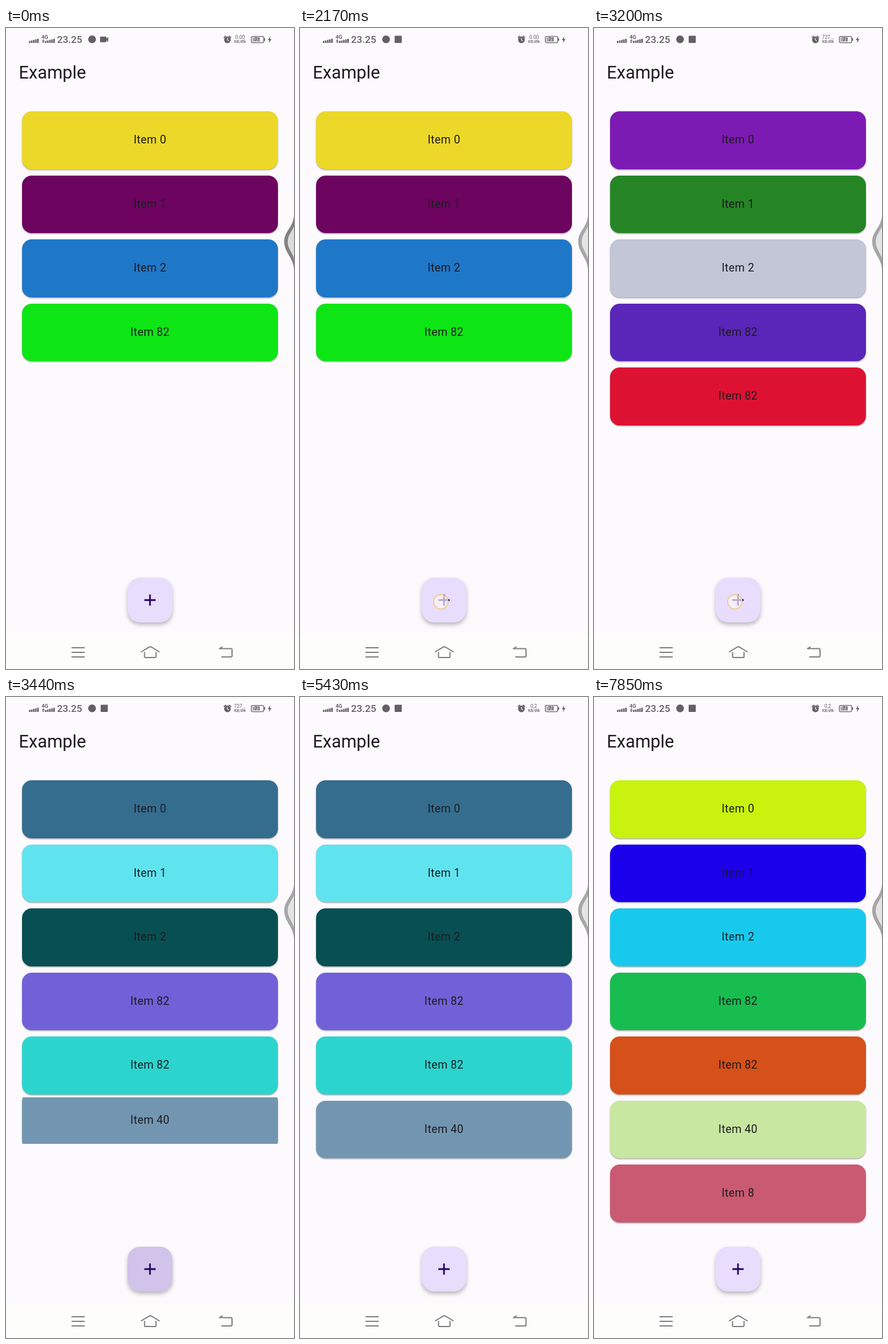
Write an HTML page that moves like this. It is 502x1116 px and loops after 8000 ms.

```html
<!DOCTYPE html>
<html lang="en">
<head>
<meta charset="utf-8">
<title>Animated list</title>
<style>
  html, body { margin: 0; width: 100%; height: 100%; overflow: hidden; background: #fdfafe; }
  body { position: relative; font-family: Roboto, sans-serif; }
  :root { --loop: 8s; --row: 111.53px; }

  /* List */
  .list { position: absolute; left: 22.4px; top: 139.7px; width: 457.2px; }
  .slot { height: var(--row); display: flex; align-items: center; overflow: hidden; }
  .card {
    flex: none; box-sizing: border-box; width: 446px; height: 100.4px; margin: 0 5.6px;
    border-radius: 16.7px; text-align: center; color: #1d1b20;
    font-size: 19.5px; line-height: 100.4px; letter-spacing: .35px;
    box-shadow: 0 1.4px 2px rgba(0, 0, 0, .26), 0 1px 3px rgba(0, 0, 0, .12);
    animation: recolor var(--loop) step-end infinite;
  }
  @keyframes recolor {
    0% { background-color: var(--a); }
    27.675% { background-color: var(--b); }
    40.3% { background-color: var(--c); }
    75.925%, 100% { background-color: var(--d); }
  }
  .first { animation: grow-first var(--loop) linear infinite; }
  .second { animation: grow-second var(--loop) linear infinite; }
  .third { animation: grow-third var(--loop) linear infinite; }
  @keyframes grow-first { 0%, 27.675% { height: 0; } 31.425%, 100% { height: var(--row); } }
  @keyframes grow-second { 0%, 40.3% { height: 0; } 44.05%, 100% { height: var(--row); } }
  @keyframes grow-third { 0%, 75.925% { height: 0; } 79.675%, 100% { height: var(--row); } }

  /* Status bar, side handle, button */
  svg { position: absolute; left: 0; top: 0; width: 502px; height: 1116px; }
  .status { fill: #626064; }
  .video { animation: until-swap var(--loop) step-end infinite; }
  .badge { animation: after-swap var(--loop) step-end infinite; }
  @keyframes until-swap { 0% { opacity: 1; } 10.625%, 100% { opacity: 0; } }
  @keyframes after-swap { 0% { opacity: 0; } 10.625%, 100% { opacity: 1; } }
  .rate { text-anchor: middle; font-size: 8.6px; animation: var(--loop) step-end infinite; }
  .idle { animation-name: rate-idle; }
  .busy { animation-name: rate-busy; }
  .slow { animation-name: rate-slow; }
  @keyframes rate-idle { 0% { opacity: 1; } 28.4%, 100% { opacity: 0; } }
  @keyframes rate-busy { 0% { opacity: 0; } 28.4% { opacity: 1; } 61.25%, 100% { opacity: 0; } }
  @keyframes rate-slow { 0% { opacity: 0; } 61.25%, 100% { opacity: 1; } }

  .handle { animation: dim var(--loop) linear infinite; }
  @keyframes dim { 0%, 12.1% { opacity: 1; } 15.9%, 100% { opacity: .7; } }

  .fab { fill: #e8ddfd; filter: drop-shadow(0 4px 3.5px rgba(0, 0, 0, .27)); }
  .ripple, .touch { opacity: 0; animation: var(--loop) linear calc(var(--t) - var(--loop)) infinite; }
  .ripple { fill: #d1c3e9; transform-origin: 245.5px 999px; animation-name: ripple; }
  .touch {
    fill: rgba(253, 246, 253, .68); stroke: #f0cb86; stroke-width: 1.8;
    animation-name: touch; animation-timing-function: step-end;
  }
  @keyframes ripple {
    0%, 1.5% { opacity: 0; transform: scale(.2); }
    3.1% { opacity: .85; transform: scale(.8); }
    4.5% { opacity: 1; transform: scale(1); }
    5.4% { opacity: .78; }
    6% { opacity: .5; }
    8.75%, 100% { opacity: 0; transform: scale(1); }
  }
  @keyframes touch { 0% { opacity: 1; } 1.9%, 100% { opacity: 0; } }
  .tap1 { --t: 2.05s; }
  .tap2 { --t: 3.08s; }
  .tap3 { --t: 4.53s; }
  .tap4 { --t: 5.92s; }
  .line { fill: none; stroke: #7d7b7f; stroke-width: 2; stroke-linecap: round; stroke-linejoin: round; }
</style>
</head>
<body>
<div class="list">
  <div class="slot"><div class="card" style="--a:#ecd828;--b:#7c1bb3;--c:#356d8f;--d:#c9f20f">Item 0</div></div>
  <div class="slot"><div class="card" style="--a:#6d0460;--b:#258524;--c:#5fe4ef;--d:#1b00ec">Item 1</div></div>
  <div class="slot"><div class="card" style="--a:#1f77c8;--b:#c2c6d6;--c:#074f52;--d:#18c9ee">Item 2</div></div>
  <div class="slot first"><div class="card" style="--a:#5a26b9;--b:#5a26b9;--c:#7061d9;--d:#18bd4f">Item 82</div></div>
  <div class="slot"><div class="card" style="--a:#0ee515;--b:#dd1233;--c:#2bd5ce;--d:#d65019">Item 82</div></div>
  <div class="slot second"><div class="card" style="--a:#7296b1;--b:#7296b1;--c:#7296b1;--d:#c8e7a0">Item 40</div></div>
  <div class="slot third"><div class="card" style="--a:#ca5a72;--b:#ca5a72;--c:#ca5a72;--d:#ca5a72">Item 8</div></div>
</div>

<svg viewBox="0 0 502 1116">
  <defs>
    <clipPath id="fab-clip"><rect x="212" y="957" width="78" height="78" rx="22"/></clipPath>
    <path id="bars" d="M0 22.5h2.6V26H0zM3.6 21.7h2.6V26H3.6zM7.2 20.8h2.6V26H7.2zM10.8 19.8h2.6V26h-2.6zM14.4 18.8H17V26h-2.6z"/>
  </defs>

  <g class="status">
    <use href="#bars" x="40"/>
    <use href="#bars" x="68"/>
    <text x="62" y="19.3" font-size="9" font-weight="700">4G</text>
    <path d="M62.6 22.4l2.4-2.6 2.4 2.6zM62.6 23.6l2.4 2.6 2.4-2.6z"/>
    <text x="89" y="26" font-size="17.2" font-weight="500">23.25</text>
    <circle cx="150" cy="19.7" r="6.8"/>
    <path class="video" d="M165.2 15h8.6q1.2 0 1.2 1.2v2.4l3.2-3v8.8l-3.2-3v2.2q0 1.2-1.2 1.2h-8.6q-1.2 0-1.2-1.2v-7.4q0-1.2 1.2-1.2z"/>
    <rect class="badge" x="165" y="13.5" width="12.4" height="12.4" rx="1"/>

    <circle cx="386" cy="20.6" r="5.8"/>
    <path d="M379.6 17l4-3.4M392.4 17l-4-3.4" stroke="#626064" stroke-width="1.7"/>
    <path d="M386 17.2v3.7l2.5 1.6" fill="none" stroke="#fdfafe" stroke-width="1.2"/>
    <text class="rate idle" x="408" y="19.2">0.00</text>
    <text class="rate busy" x="408" y="19.2">727...</text>
    <text class="rate slow" x="407.5" y="19.2">0,2</text>
    <text x="408" y="26" font-size="6.6" font-weight="500" text-anchor="middle">KB/dtk</text>

    <rect x="427.6" y="14.6" width="21.6" height="11" rx="2.4" fill="none" stroke="#626064" stroke-width="1.3"/>
    <rect x="429.6" y="16.5" width="13" height="7.2" fill="#aaa8ac"/>
    <rect x="449.8" y="17.6" width="1.8" height="5" rx=".8"/>
    <text x="438" y="23.4" font-size="8.6" font-weight="700" text-anchor="middle">71</text>
    <path d="M460.6 14.6l-4.2 6.5h2.7l-.9 5.2 4.6-7h-2.9z"/>
  </g>

  <text x="22.3" y="88" font-size="30.7" fill="#1d1b20">Example</text>

  <g class="handle">
    <path d="M502 326C500 349 485 353 485 372S500 398 502 420z" fill="#828282"/>
    <path d="M502 345C499 354 491 360 491 372S499 391 502 401z" fill="#dbdbdb"/>
  </g>

  <rect class="fab" x="212" y="957" width="78" height="78" rx="22"/>
  <g clip-path="url(#fab-clip)">
    <circle class="ripple tap1" cx="245.5" cy="999" r="64"/>
    <circle class="ripple tap2" cx="245.5" cy="999" r="64"/>
    <circle class="ripple tap3" cx="245.5" cy="999" r="64"/>
    <circle class="ripple tap4" cx="245.5" cy="999" r="64"/>
  </g>
  <path d="M241.2 996h19.6M251 986.2v19.6" stroke="#21005d" stroke-width="2.8"/>
  <circle class="touch tap1" cx="245.5" cy="999" r="12.5"/>
  <circle class="touch tap2" cx="245.5" cy="999" r="12.5"/>
  <circle class="touch tap3" cx="245.5" cy="999" r="12.5"/>
  <circle class="touch tap4" cx="245.5" cy="999" r="12.5"/>

  <rect y="1058" width="502" height="58" fill="#fdfdfb"/>
  <g class="line">
    <path d="M115 1079h21.5M115 1087h21.5M115 1095h21.5"/>
    <path d="M241.5 1087v7.5q0 1.5 1.5 1.5h17q1.5 0 1.5-1.5v-7.5M236 1086l13.5-8.2q2-1.2 4 0L267 1086"/>
    <path d="M372 1080.5h20q2 0 2 2v10.500q0 2-2 2h-16M372 1080.500l5-3"/>
  </g>
</svg>
</body>
</html>
```
